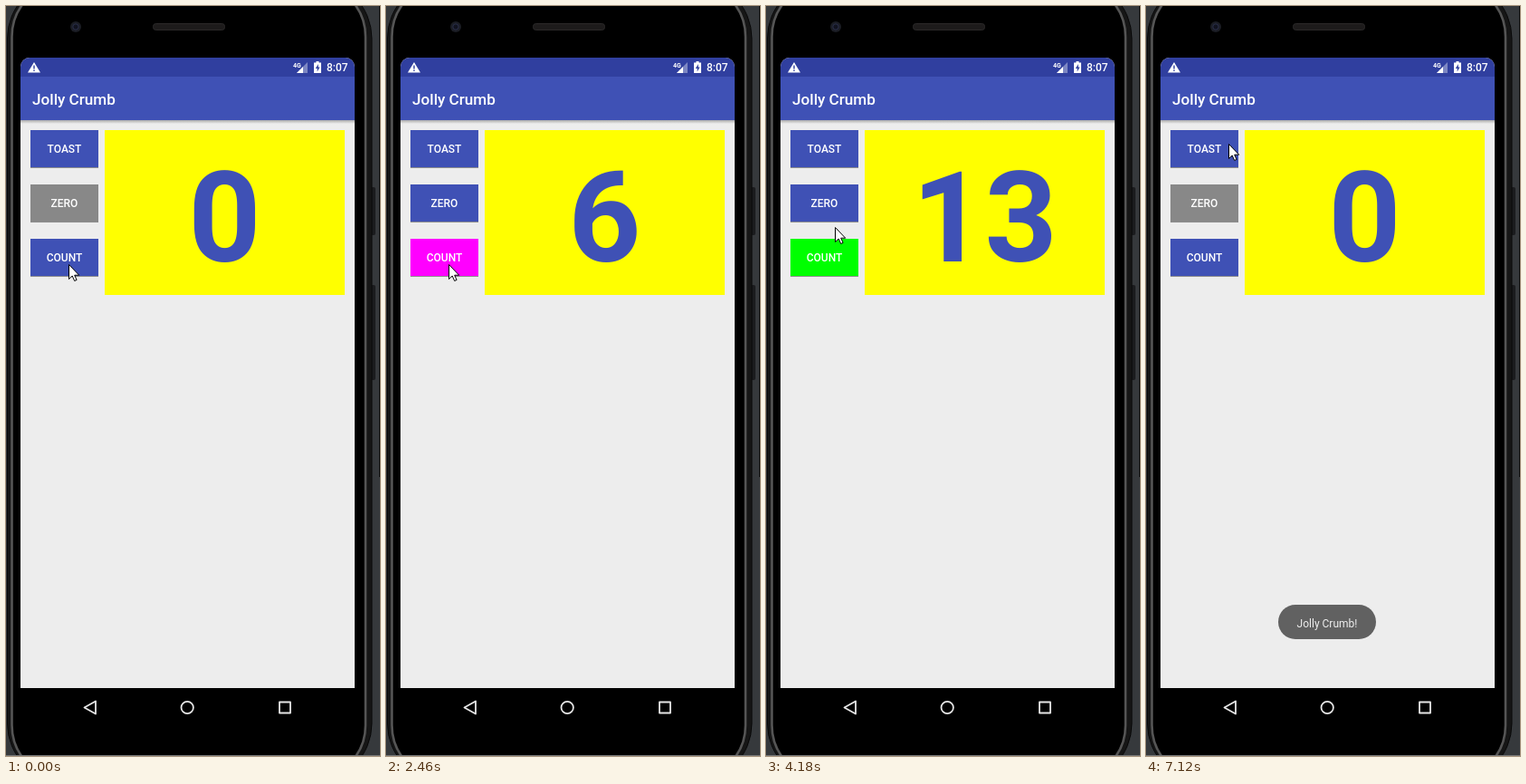
Write an HTML page that moves like this. It is 413 by 828 pixels and loops after 8000 ms.

```html
<!DOCTYPE html>
<html lang="en">
<head>
<meta charset="utf-8">
<title>Counter app</title>
<style>
  html, body { margin: 0; width: 100%; height: 100%; overflow: hidden; background: #000; }
  svg { display: block; width: 413px; height: 828px; font-family: Roboto, sans-serif; }
  text { fill: #fff; font-weight: 500; }
  .label { font-size: 12px; text-anchor: middle; }
  .nav { fill: none; stroke: #e6e6e6; stroke-width: 1.8; stroke-linejoin: round; }
</style>
</head>
<body>
<svg viewBox="0 0 413 828">
  <defs>
    <linearGradient id="drop" x2="0" y2="1">
      <stop stop-color="#aaa"/>
      <stop offset="1" stop-color="#ededed"/>
    </linearGradient>
  </defs>

  <!-- Phone body -->
  <rect width="413" height="828" fill="#36393c"/>
  <rect x="412" width="1" height="520" fill="#0c0c0c"/>
  <rect x="403" y="200" width="5" height="53" rx="2" fill="#1b1c1e"/>
  <rect x="403" y="308" width="5" height="105" rx="2" fill="#1b1c1e"/>
  <rect x="1.5" y="-29" width="402.5" height="886" rx="65" fill="#161616" stroke="#080808"/>
  <rect x="6.5" y="-26" width="390.5" height="880" rx="60" fill="#000" stroke="#555" stroke-width="2.6"/>
  <rect x="162.5" y="19.5" width="79" height="7" rx="3" fill="#1d1b1b" stroke="#2b2929"/>
  <circle cx="77" cy="23" r="6" fill="#1b1d24"/>
  <circle cx="77" cy="23" r="3.2" fill="#11131f" stroke="#2b304c"/>
  <rect y="827" width="413" height="1" fill="#777"/>

  <!-- Screen -->
  <path d="M16 753V67a10 10 0 0 1 10-10H375a10 10 0 0 1 10 10V753z" fill="#ededed"/>
  <path d="M16 78V67a10 10 0 0 1 10-10H375a10 10 0 0 1 10 10V78z" fill="#303f9f"/>
  <rect x="16" y="126" width="369" height="4" fill="url(#drop)"/>
  <rect x="16" y="78" width="369" height="48" fill="#3f51b5"/>
  <text x="29" y="108.5" font-size="17.14">Jolly Crumb</text>

  <!-- Status icons -->
  <path d="M31 62l7 11.5H24z" fill="#fff"/>
  <path d="M31 65.5v4M31 70.5v1.6" stroke="#303f9f" stroke-width="1.4"/>
  <text x="317" y="68" font-size="7" style="font-weight:700">4G</text>
  <path d="M333 62v12h-12z" fill="#7d87c3"/>
  <path d="M328 67v7h-7z" fill="#fff"/>
  <path d="M342.5 61h3v1.5h2.5V74h-8V62.500h2.500z" fill="#fff"/>
  <path d="M344.800 64l-3 5h1.900v3.500l2.900-5h-1.800z" fill="#303f9f"/>
  <text x="354" y="72.300" font-size="12">8:07</text>

  <rect x="109" y="137" width="265" height="182" fill="#ff0"/>
  <text id="number" x="241.500" y="282" font-size="140" text-anchor="middle" style="fill:#3f51b5;font-weight:700"></text>
  <g id="buttons"></g>

  <!-- Navigation -->
  <path class="nav" d="M99 767.500v14l-12.500-7z"/>
  <circle class="nav" cx="200.200" cy="774.500" r="6.700"/>
  <rect class="nav" x="302" y="768.500" width="12" height="12"/>

  <g id="toast">
    <rect x="146" y="661" width="108" height="38" rx="19" fill="#616161"/>
    <text class="label" x="200" y="685.500" style="font-weight:400;fill:#eee">Jolly Crumb!</text>
  </g>
  <path id="cursor" d="M.5.5v16l3.700-3.500 2.500 5.500 2.400-1.100-2.400-5.200h5z" fill="#fff" stroke="#000"/>
</svg>
<script>
const LOOP = 8000;
const BLUE = '#3f51b5', GRAY = '#888', GREEN = '#0f0', PINK = '#f0f';
const find = id => document.getElementById(id);

// Hard-stepped tracks: [start time, value...]
const counts = [[0, 0], [1120, 1], [1580, 2], [1720, 3], [1870, 4], [2150, 5], [2460, 6], [2750, 7],
  [3060, 8], [3210, 9], [3360, 10], [3790, 11], [3910, 12], [4180, 13], [5150, 0]];
const pointer = [[0, 69, 285], [4180, 76, 244], [4300, 76, 234], [4450, 76, 229], [4600, 76, 226],
  [4720, 76, 224], [5800, 93, 149], [5950, 92, 144], [6070, 91, 150], [6220, 91, 152]];
const toastAlpha = [[0, 0], [6760, .2], [6880, .5], [7000, .8], [7120, 1]];
const lifts = {
  TOAST: [[0, 0], [6470, 1], [6610, 2], [6760, 1], [6880, 0]],
  ZERO: [[0, 0], [5150, 2], [5270, 0]],
  COUNT: [[0, 0], [1120, 1], [1280, 0], [1420, 2], [2460, 0.5], [2750, 2], [3360, 1], [3490, 0],
    [3640, 2], [4180, .5], [4300, 0]]
};
const at = (track, t) => track.findLast(step => step[0] <= t).slice(1);

const buttons = Object.keys(lifts).map((name, i) => {
  const y = 137 + 60 * i;
  find('buttons').insertAdjacentHTML('beforeend',
    `<g><rect x="27" y="${y}" width="75" height="41"/><text class="label" x="64.500" y="${y + 25.3}">${name}</text></g>`);
  return { name, rect: find('buttons').lastElementChild.firstElementChild };
});

function render(t) {
  const [count] = at(counts, t);
  const [x, y] = at(pointer, t);
  const colors = {
    TOAST: BLUE,
    ZERO: count ? BLUE : GRAY,
    COUNT: !count ? BLUE : count % 2 ? GREEN : PINK
  };
  for (const { name, rect } of buttons) {
    const [lift] = at(lifts[name], t);
    rect.setAttribute('fill', colors[name]);
    rect.style.filter = `drop-shadow(0 ${1 + lift * .6}px ${.5 + lift * .5}px rgba(0,0,0,.4))`;
  }
  find('number').textContent = count;
  find('cursor').setAttribute('transform', `translate(${x} ${y})`);
  find('toast').setAttribute('opacity', at(toastAlpha, t)[0]);
}

const start = performance.now();
function tick() {
  render((performance.now() - start) % LOOP);
  requestAnimationFrame(tick);
}
tick();
</script>
</body>
</html>
```
